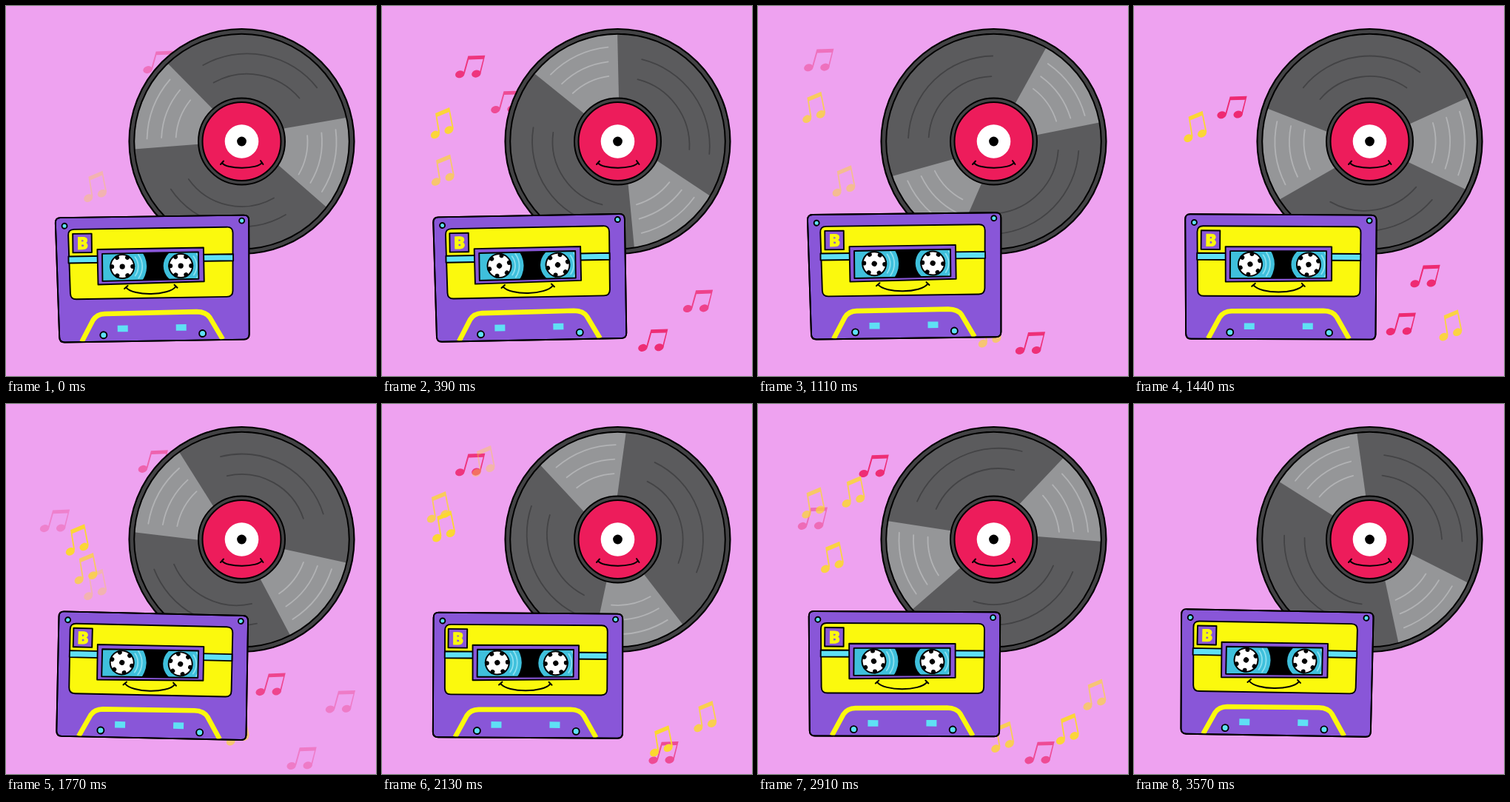
An HTML page for the animation above (3.6 s loop, 500 by 500 pixels).

```html
<!DOCTYPE html>
<html lang="en">
<head>
<meta charset="utf-8">
<title>Record and cassette</title>
<style>
  html, body { margin: 0; width: 100%; height: 100%; overflow: hidden; background: #eea2f0; }
  svg { display: block; width: 100vw; height: 100vh; }
  .ink { fill: none; stroke: #000; stroke-width: 2; stroke-linecap: round; stroke-linejoin: round; }
  .line { stroke: #000; stroke-width: 1.9; stroke-linejoin: round; }
  .groove { fill: none; stroke-width: 1.8; stroke-linecap: round; }
  .purple { fill: #8956d8; }
  .yellow { fill: #fbf90d; }
  .cyan { fill: #5fe0f5; }
  .badge { font: 800 23px "Open Sans", Inter, sans-serif; text-anchor: middle; stroke: #fbf90d; stroke-width: .8; }
</style>
</head>
<body>
<svg viewBox="0 0 500 500">
  <defs>
    <g id="pinkNote" fill="#ee2a72">
      <ellipse cx="6.2" cy="25.5" rx="6.3" ry="4.9" transform="rotate(-15 6.2 25.5)"/>
      <ellipse cx="28.3" cy="24.8" rx="6.3" ry="4.9" transform="rotate(-15 28.3 24.8)"/>
      <path d="M10.6 25 L17.3 .8 L40.3 0 L34.3 24.5 L32.6 24 L37.6 5 L18 5.7 L12.6 25Z"/>
    </g>
    <g id="yellowNote" fill="#fcd92e">
      <ellipse cx="6.2" cy="37" rx="6.3" ry="5" transform="rotate(-30 6.2 37)"/>
      <ellipse cx="24.8" cy="30.6" rx="6.3" ry="5" transform="rotate(-30 24.8 30.6)"/>
      <path d="M10.6 35 L6.4 8 L25.5 0 L31.2 28.5 L29.4 29 L24.9 6.2 L8.9 12.8 L12.5 34.5Z"/>
    </g>
    <g id="reel">
      <circle r="17"/>
      <g class="spin"></g>
    </g>
    <clipPath id="pane"><path d="M-66.5 -17.5 L63.5 -18.5 V18 L-66.5 19.5Z"/></clipPath>
    <clipPath id="rim"><circle r="145"/></clipPath>
  </defs>

  <rect width="500" height="500" fill="#eea2f0"/>
  <g id="notes"></g>

  <g transform="translate(318.5 183)">
    <circle r="152" fill="#434345" stroke="#000" stroke-width="2.2"/>
    <circle r="145.5" fill="#5b5b5d"/>
    <g clip-path="url(#rim)"><g id="disc"></g></g>
    <circle r="145.3" class="ink"/>
    <circle r="58.5" fill="#434345" stroke="#000" stroke-width="2"/>
    <circle r="53" fill="#ed1c5b" stroke="#000" stroke-width="2"/>
    <circle r="22.8" fill="#fff"/>
    <circle r="6.4"/>
    <path class="ink" d="M-26.5 29 C-21 38 22 38 27.5 28.5 M-28.5 31 L-24.5 26.5 M25.5 26 L29 31"/>
  </g>

  <g id="tape">
    <path id="body" class="purple line"/>
    <path id="panel" class="yellow line"/>
    <path id="stripe" class="cyan line"/>
    <g id="holes" class="cyan line">
      <circle r="3.5" cy="-55.8"/><circle r="3.5" cy="-60"/>
      <circle r="4.5" cx="-66" cy="92.3"/><circle r="4.5" cx="67.8" cy="91.8"/>
    </g>
    <rect class="purple line" x="-106" y="-45" width="25.5" height="25.5"/>
    <text class="badge yellow" x="-93" y="-23.8">B</text>
    <path class="purple line" d="M-73 -23.5 L70.5 -24.3 L70.8 21.5 L-72.5 24Z"/>
    <g clip-path="url(#pane)">
      <rect x="-70" y="-22" width="140" height="45" fill="#3fc0dc"/>
      <rect x="-22" y="-22" width="52" height="45"/>
      <g fill="#3fc0dc"><circle cx="-39.5" r="33"/><circle cx="39.5" r="23.5"/></g>
      <g id="shine" class="groove" stroke="#8be0f0" stroke-width="1.4"></g>
      <use href="#reel" x="-39.5"/>
      <use href="#reel" x="39.5"/>
    </g>
    <path class="line" fill="none" d="M-66.5 -17.5 L63.5 -18.5 V18 L-66.5 19.5Z"/>
    <path class="ink" d="M-34.5 28.5 C-25 40.5 23 40.5 32.5 27.8 M-37 30 L-32.5 26 M30.5 25.5 L34.5 29.5"/>
    <path fill="none" stroke="#fbf90d" stroke-width="6.6" d="M-95.5 101 L-80 72 Q-75 64 -64 63.6 L60 62.3 Q73 62.5 78 70.5 L95 100"/>
    <path class="cyan" d="M-47 79.6 h14 v8.6 h-14Z M32 79 h14 v8.6 h-14Z"/>
    <path id="edge" class="line" fill="none"/>
  </g>
</svg>

<script>
const LOOP = 3600, STEP = 30, LIFE = 720;
const $ = id => document.getElementById(id);

function add(parent, tag, attrs) {
  const el = document.createElementNS('http://www.w3.org/2000/svg', tag);
  for (const k in attrs) el.setAttribute(k, attrs[k]);
  return parent.appendChild(el);
}

const polar = (r, deg) => {
  const a = deg * Math.PI / 180;
  return [r * Math.cos(a), r * Math.sin(a)];
};
const arc = (r0, a0, r1, a1) => {
  const r = (r0 + r1) / 2;
  return `M${polar(r0, a0)} A${r} ${r} 0 0 1 ${polar(r1, a1)}`;
};

// Record: two light sectors, three grooves in each, two in each dark part
const disc = $('disc');
function sector(mid, apex) {
  add(disc, 'path', {
    fill: '#959698',
    d: `M${apex} L${polar(146, mid - 25.3)} A146 146 0 0 1 ${polar(146, mid + 25.3)}Z`
  });
  for (let i = 0; i < 3; i++) {
    const r = 128 - 19.5 * i, half = 19.6 - i;
    add(disc, 'path', { class: 'groove', stroke: '#b2b3b5', d: arc(r, mid - half, r, mid + half) });
  }
}
sector(-158.8, [3, -1]);
sector(12.5, [3.5, -8.3]);
for (const inset of [0, 27.5]) {
  const trim = inset / 20;
  for (const [mid, half, grow] of [[102.5, 43.5, 0], [283.8, 40.7, 9.5]])
    add(disc, 'path', {
      class: 'groove', stroke: '#434345',
      d: arc(115.5 - inset, mid - half + trim, 115.5 - inset + grow, mid + half - trim)
    });
}

// Reels
const spin = document.querySelector('.spin');
add(spin, 'circle', { r: 15, fill: '#fff' });
for (let i = 0; i < 6; i++) add(spin, 'circle', { r: 3, cx: 14, transform: `rotate(${i * 60})` });
add(spin, 'circle', { r: 3.6 });
for (const x of [-39.5, 39.5]) for (const r of [21.5, 27])
  add($('shine'), 'path', { transform: `translate(${x})`, d: arc(r, -36, r, 36) });

// Key poses of the cassette: time, x, y, angle, spread of the top edge
const poses = [
  [0, 196.7, 351.6, -.7, 3],
  [810, 199.5, 349.2, -1.15, 0],
  [1110, 196.7, 347.9, -.55, 3],
  [1770, 196.2, 350.4, 1.45, 0],
  [2460, 194.5, 349.5, -.2, 0],
  [2910, 196, 347.8, .4, 1.5],
  [LOOP, 191, 346.7, 1.2, 2]
];

function poseAt(t) {
  const i = poses.findIndex(p => p[0] > t), a = poses[i - 1], b = poses[i];
  const u = (t - a[0]) / (b[0] - a[0]), e = u * u * (3 - 2 * u);
  return a.map((v, k) => v + (b[k] - v) * e).slice(1);
}

// Closed four-sided shape with rounded corners
function rounded(pts, r) {
  const toward = (p, q) => {
    const k = r / Math.hypot(q[0] - p[0], q[1] - p[1]);
    return [p[0] + (q[0] - p[0]) * k, p[1] + (q[1] - p[1]) * k];
  };
  return pts.map((p, i) => {
    const a = toward(p, pts[(i + 3) % 4]), b = toward(p, pts[(i + 1) % 4]);
    return `${i ? 'L' : 'M'}${a} Q${p} ${b}`;
  }).join(' ') + 'Z';
}

function drawTape(t) {
  const [x, y, angle, s] = poseAt(t), p = s / 2;
  const body = rounded([[-126.3 - s, -67], [129.3 + s, -67.5], [130.8, 100.5], [-125.5, 101.5]], 7);
  $('tape').setAttribute('transform', `translate(${x} ${y}) rotate(${angle})`);
  $('body').setAttribute('d', body);
  $('edge').setAttribute('d', body);
  $('panel').setAttribute('d', rounded([[-110.7 - p, -51], [109 + p, -51.7], [109.3, 42.5], [-110, 43.5]], 8));
  $('stripe').setAttribute('d', `M${-110.6 - p} -14.5 L${109 + p} -15 V-6 L${-110.6 - p} -5.5Z`);
  const [left, right] = $('holes').children;
  left.setAttribute('cx', -114 - s);
  right.setAttribute('cx', 119.7 + s);
}

// Notes drift along cubic curves; starts are the moments they set off
const trails = [
  { note: 'pinkNote', starts: [-80, 470, 1660, 2610], path: [[203, 55], [150, 74], [96, 74], [45, 51]] },
  { note: 'pinkNote', starts: [220, 1100, 2280], path: [[182, 108], [133, 117], [83, 125], [36, 147]] },
  { note: 'pinkNote', starts: [-130, 360, 1110, 2170], path: [[330, 180], [350, 366], [402, 400], [442, 384]] },
  { note: 'pinkNote', starts: [-30, 670, 1110, 1580, 2360], path: [[340, 255], [334, 425], [334, 462], [393, 465]] },
  { note: 'yellowNote', starts: [-60, 570, 1010, 1600, 1710, 2355, 2670], path: [[112, 233], [84, 194], [55, 125], [55, 76]] },
  { note: 'yellowNote', starts: [235, 1480, 2400], path: [[74, 241], [35, 182], [145, 104], [117, 36]] },
  { note: 'yellowNote', starts: [965, 1625, 1800, 2330, 2465, 2710], path: [[266, 375], [295, 470], [460, 460], [452, 290]] }
];
const notes = trails.flatMap(({ note, starts, path }) =>
  starts.map(start => ({ start, path, el: add($('notes'), 'use', { href: '#' + note }) })));

function bezier([a, b, c, d], u) {
  const v = 1 - u;
  return [0, 1].map(k => v * v * v * a[k] + 3 * u * v * v * b[k] + 3 * u * u * v * c[k] + u * u * u * d[k]);
}

function drawNotes(t) {
  for (const { start, path, el } of notes) {
    const u = (t - start) / LIFE, on = u > 0 && u < 1;
    el.setAttribute('visibility', on ? 'visible' : 'hidden');
    if (!on) continue;
    el.setAttribute('transform', `translate(${bezier(path, u)})`);
    el.setAttribute('opacity', Math.sin(Math.PI * u) ** .85);
  }
}

function draw(t) {
  const turn = `rotate(${t / 9})`;
  disc.setAttribute('transform', turn);
  spin.setAttribute('transform', turn);
  drawTape(t);
  drawNotes(t);
}

const begin = performance.now();
function tick() {
  const t = (performance.now() - begin) % LOOP;
  draw(Math.floor(t / STEP) * STEP);
  requestAnimationFrame(tick);
}
draw(0);
requestAnimationFrame(tick);
</script>
</body>
</html>
```
